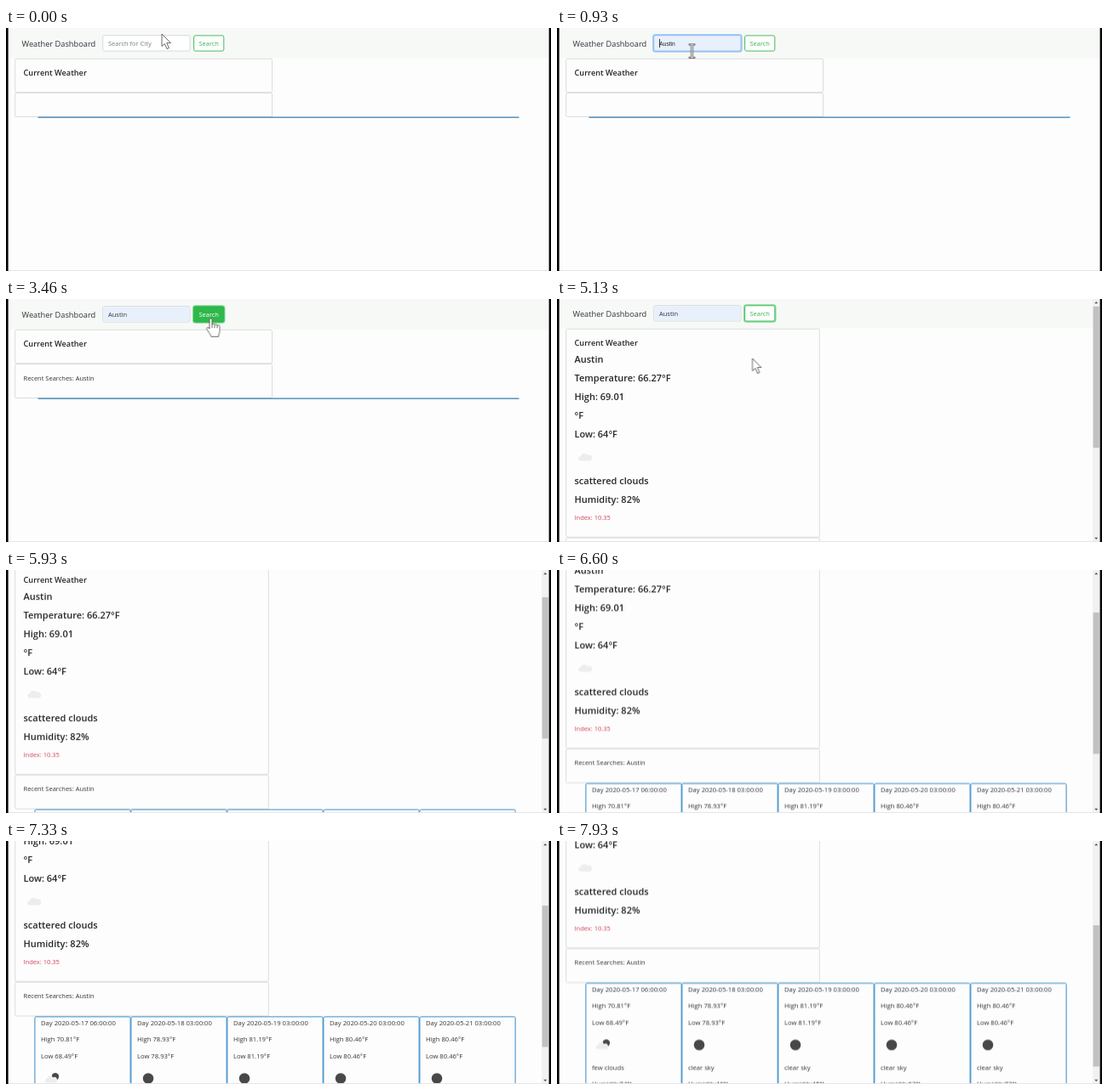
Recreate the animation shown at these times as an HTML page. Size 640x286 px, loop 8 s.

```html
<!DOCTYPE html>
<html lang="en">
<head>
<meta charset="utf-8">
<title>Weather Dashboard</title>
<style>
  @property --scroll { syntax: "<number>"; inherits: true; initial-value: 0; }

  html, body { margin: 0; width: 100%; height: 100%; overflow: hidden; background: #fdfdfd; }
  svg { display: block; width: 100vw; height: 100vh; animation: scroll 8s linear infinite; }
  text { font: 7.5px "Open Sans", "Noto Sans", sans-serif; fill: #303438; }
  .brand { font-size: 9.25px; }
  .title { font-size: 9.2px; font-weight: 600; fill: #212529; }
  .big { font-size: 11px; font-weight: 600; fill: #212529; }
  .day text { font-size: 7.65px; }
  .day rect { fill: none; stroke: #3489c9; }
  .card { fill: none; stroke: #dcdcdc; }
  .rule { fill: #3a80b5; }
  .cloud { fill: #ededed; }
  .moon { fill: #48484a; }
  .cursor path { fill: #fff; stroke: #444; stroke-width: .8; stroke-linejoin: round; }

  .page { transform: translateY(calc(var(--scroll) * -1px)); }
  .thumb { transform: translateY(calc(var(--scroll) * .585px)); }
  @keyframes scroll {
    0%, 63.8% { --scroll: 0; }
    64.125% { --scroll: 1; }
    70.75%, 74% { --scroll: 40; }
    79.125%, 82.1% { --scroll: 70.5; }
    82.5% { --scroll: 71.5; }
    87.5%, 89.7% { --scroll: 106; }
    90% { --scroll: 107; }
    91.625% { --scroll: 116; }
    99.125%, 100% { --scroll: 155.5; }
  }

  /* Hard switches */
  .switch { animation: 8s step-end infinite; }
  .placeholder { animation-name: placeholder; }
  .filled { animation-name: filled; }
  .preview { animation-name: preview; }
  .value { animation-name: value; }
  .caret { animation-name: caret; }
  .caret-end { animation-name: caret-end; }
  .empty { animation-name: empty; }
  .recent { animation-name: recent; }
  .before { animation-name: before; }
  .after { animation-name: after; }
  .arrow { animation-name: arrow; }
  .beam { animation-name: beam; }
  .hand { animation-name: hand; }
  @keyframes placeholder { 0% { opacity: 1; } 11.6%, 100% { opacity: 0; } }
  @keyframes filled { 0% { opacity: 0; } 11.6%, 100% { opacity: 1; } }
  @keyframes preview { 0% { opacity: 0; } 11.6% { opacity: 1; } 29.1%, 100% { opacity: 0; } }
  @keyframes value { 0% { opacity: 0; } 29.1%, 100% { opacity: 1; } }
  @keyframes caret {
    0% { opacity: 0; } 10.7% { opacity: 1; } 18.2% { opacity: 0; }
    24.9% { opacity: 1; } 29.1%, 100% { opacity: 0; }
  }
  @keyframes caret-end { 0% { opacity: 0; } 29.1% { opacity: 1; } 35.7%, 100% { opacity: 0; } }
  @keyframes empty { 0% { opacity: 1; } 41.6%, 100% { opacity: 0; } }
  @keyframes recent { 0% { opacity: 0; } 41.6%, 100% { opacity: 1; } }
  @keyframes before { 0% { opacity: 1; } 45%, 100% { opacity: 0; } }
  @keyframes after { 0% { opacity: 0; } 45%, 100% { opacity: 1; } }
  @keyframes arrow {
    0% { opacity: 1; } 6% { opacity: 0; } 33.2% { opacity: 1; } 34.6% { opacity: 0; }
    49% { opacity: 1; } 65%, 100% { opacity: 0; }
  }
  @keyframes beam { 0% { opacity: 0; } 6% { opacity: 1; } 33.2%, 100% { opacity: 0; } }
  @keyframes hand { 0% { opacity: 0; } 34.6% { opacity: 1; } 49%, 100% { opacity: 0; } }

  /* Eased changes */
  .focus { animation: focus 8s linear infinite; }
  .hover { animation: hover 8s linear infinite; }
  .ring { animation: ring 8s linear infinite; }
  .cursor { animation: move 8s ease-in-out infinite; }
  @keyframes focus {
    0%, 8.7% { opacity: 0; } 10.6%, 40% { opacity: 1; } 41.8%, 100% { opacity: 0; }
  }
  @keyframes hover {
    0%, 34.6% { opacity: 0; } 36.5%, 49% { opacity: 1; } 50.9%, 100% { opacity: 0; }
  }
  @keyframes ring { 0%, 40% { opacity: 0; } 41.8%, 100% { opacity: 1; } }
  @keyframes move {
    0%, .7% { transform: translate(183px, 7px); }
    10.75%, 25% { transform: translate(158.5px, 27px); }
    26.6%, 29.1% { transform: translate(159.5px, 27px); }
    36.6%, 48% { transform: translate(240.5px, 23px); }
    52.5%, 100% { transform: translate(229.5px, 70px); }
  }
</style>
</head>
<body>
<svg viewBox="0 0 640 286" preserveAspectRatio="none">
  <rect width="640" height="286" fill="#fdfdfd"/>

  <g class="page">
    <rect width="640" height="35.7" fill="#f7f9f7"/>
    <text class="brand" x="18.5" y="21.6">Weather Dashboard</text>

    <rect x="113.7" y="8.7" width="102.3" height="18.4" rx="2" fill="#fff" stroke="#d3d7da" stroke-width=".9"/>
    <rect class="switch filled" x="114.2" y="9.2" width="101.3" height="17.4" rx="1.5" fill="#e8f0fb"/>
    <g class="focus" fill="none">
      <rect x="112.9" y="7.9" width="103.9" height="20" rx="2.6" stroke="#a9cdf8" stroke-width="1.8"/>
      <rect x="113.7" y="8.7" width="102.3" height="18.4" rx="2" stroke="#83b8f2" stroke-width=".9"/>
    </g>
    <text class="switch placeholder" x="120" y="20.7" style="fill:#767d84">Search for City</text>
    <text class="switch preview" x="120.3" y="20.6" style="font:6.67px 'Liberation Sans',sans-serif;fill:#222">Austin</text>
    <text class="switch value" x="120" y="20.6">Austin</text>
    <rect class="switch caret" x="120" y="13" width=".9" height="10" fill="#222"/>
    <rect class="switch caret-end" x="143.5" y="13" width=".8" height="10" fill="#222"/>

    <rect class="ring" x="219.9" y="8.2" width="36.6" height="19.6" rx="2.6" fill="none" stroke="#86dc99" stroke-width="2"/>
    <rect x="220.6" y="8.9" width="35.2" height="18.2" rx="2" fill="#fdfefd" stroke="#45bd5e"/>
    <text x="238.2" y="20.7" text-anchor="middle" style="fill:#3fb558">Search</text>
    <g class="hover">
      <rect x="220.1" y="8.4" width="36.2" height="19.2" rx="2.3" fill="#2fb84b"/>
      <text x="238.2" y="20.7" text-anchor="middle" style="fill:#fff">Search</text>
    </g>

    <text class="title" x="20.5" y="56.2">Current Weather</text>

    <g class="switch before">
      <rect class="card" x="10.7" y="36.3" width="301.8" height="39.4" rx="1.5"/>
      <g class="switch empty">
        <rect class="card" x="10.7" y="76.6" width="301.8" height="27.9" rx="1.5"/>
        <rect class="rule" x="37.5" y="104.5" width="565" height="1.3"/>
      </g>
      <g class="switch recent">
        <rect class="card" x="10.7" y="76.6" width="301.8" height="39.9" rx="1.5"/>
        <rect class="rule" x="37.5" y="116.5" width="565" height="1.3"/>
        <text x="20.5" y="95.8">Recent Searches: Austin</text>
      </g>
    </g>

    <g class="switch after">
      <rect class="card" x="10.7" y="36.3" width="297.6" height="245" rx="1.5"/>
      <rect class="card" x="10.7" y="282.2" width="297.6" height="39.8" rx="1.5"/>
      <g id="current"></g>
      <path class="cloud" transform="translate(33 187)" d="M-5 4.5a2.6 2.6 0 0 1-.3-5.2A4.5 4.5 0 0 1 2.8-2.3A3.3 3.3 0 0 1 6 4.5z"/>
      <text x="20.5" y="261.2" style="fill:#d0405a">Index: 10.35</text>
      <text x="20.5" y="301.4">Recent Searches: Austin</text>
      <g id="forecast"></g>
    </g>
  </g>

  <g class="switch after">
    <rect x="629" width="8.5" height="286" fill="#f1f1f1"/>
    <rect class="thumb" x="629.6" y="8.2" width="7.2" height="166.3" fill="#c1c1c1"/>
    <path d="M631.2 5.3l2-2.4 2 2.4zM631.2 280.7l2 2.4 2-2.4z" fill="#505050"/>
  </g>

  <rect y="285" width="640" height="1" fill="#e6e6e6"/>
  <rect width="2.6" height="286"/>
  <rect x="637.6" width="2.4" height="286"/>

  <g class="cursor">
    <path class="switch arrow" d="M0 0V14.6L3.3 11.5L6 17.6L8.4 16.5L5.8 10.6H10.4Z"/>
    <g class="switch beam">
      <path d="M-3.4 -8.2H-.6L0 -7.6L.6 -8.2H3.4V-6.8H1V7.2H3.4V8.6H.6L0 8L-.6 8.6H-3.4V7.2H-1V-6.8H-3.4Z"/>
    </g>
    <g class="switch hand">
      <path d="M-1.5 1.3C-1.5 -.6 1.5 -.6 1.5 1.3V7.2C2 5.7 4.4 5.9 4.5 7.5C5.2 6.2 7.4 6.5 7.5 8.2C8.4 7.2 10.6 7.7 10.6 9.4V14.5C10.6 17 9.2 18 9 21.3H.3C0 18.6 -2.8 16.2 -4.6 12.4C-5.4 10.5 -3.3 9.8 -2.2 11.2L-1.5 12.1Z"/>
      <path d="M1.5 7V11M4.5 7.5V11M7.5 8.2V11.2" fill="none"/>
    </g>
  </g>
</svg>

<script>
  const label = (x, y, content, cls = "") =>
    `<text class="${cls}" x="${x}" y="${y}">${content}</text>`;

  const current = [
    [76, "Austin"], [98, "Temperature: 66.27°F"], [120, "High: 69.01"], [142, "°F"],
    [164, "Low: 64°F"], [219, "scattered clouds"], [241.3, "Humidity: 82%"]
  ];
  document.getElementById("current").innerHTML =
    current.map(([y, content]) => label(20.5, y, content, "big")).join("");

  const clearIcon = `<circle class="moon" cx="20.5" cy="395.5" r="6.3"/>`;
  const cloudyIcon = `<circle class="moon" cx="24.4" cy="393.3" r="4.2"/>
    <path class="cloud" transform="translate(19.3 396.5)"
      d="M-4.6 4a2.4 2.4 0 0 1-.3-4.8A4.2 4.2 0 0 1 2.5-2.2A3.1 3.1 0 0 1 5.4 4z"/>`;

  const days = [
    { time: "06", high: 70.81, low: 68.49, sky: "few clouds", humidity: 74 },
    { time: "03", high: 78.93, low: 78.93, sky: "clear sky", humidity: 46 },
    { time: "03", high: 81.19, low: 81.19, sky: "clear sky", humidity: 45 },
    { time: "03", high: 80.46, low: 80.46, sky: "clear sky", humidity: 63 },
    { time: "03", high: 80.46, low: 80.46, sky: "clear sky", humidity: 72 }
  ];
  document.getElementById("forecast").innerHTML = days.map((day, i) => `
    <g class="day" transform="translate(${33.5 + i * 113} 0)">
      <rect x=".4" y="322.9" width="112.2" height="160" rx="1.5"/>
      ${label(7.5, 332.6, `Day 2020-05-${17 + i} ${day.time}:00:00`)}
      ${label(7.5, 352.4, `High ${day.high}°F`)}
      ${label(7.5, 372.2, `Low ${day.low}°F`)}
      ${day.sky === "clear sky" ? clearIcon : cloudyIcon}
      ${label(7.5, 424.6, day.sky)}
      ${label(7.5, 444.4, `Humidity${day.humidity}%`)}
    </g>`).join("");
</script>
</body>
</html>
```
